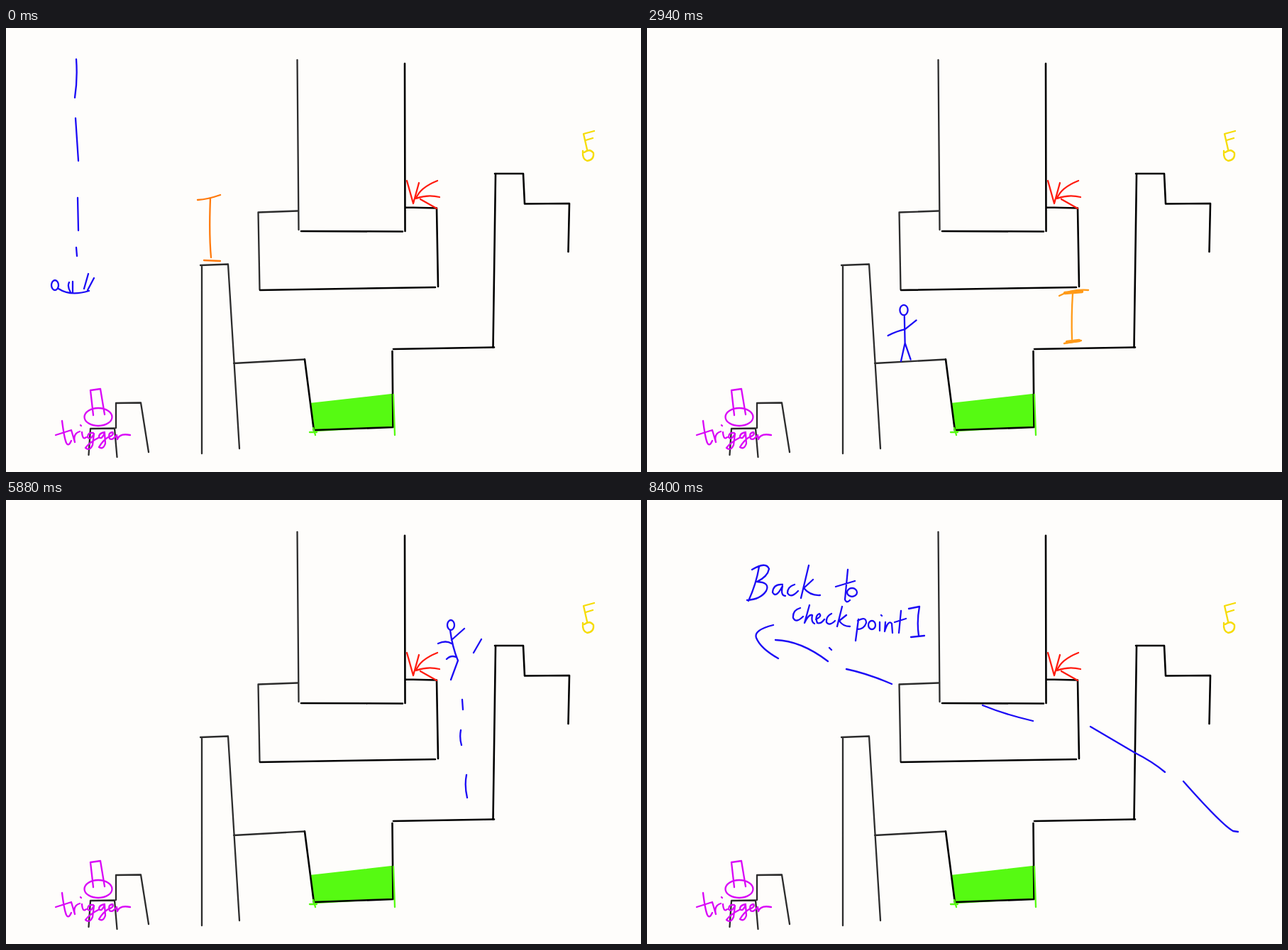
An HTML page for the animation above (8820 ms loop, 895 px wide and 625 px high).

```html
<!DOCTYPE html>
<html lang="en">
<head>
<meta charset="utf-8">
<title>Level sketch</title>
<style>
  html, body { margin: 0; width: 100%; height: 100%; overflow: hidden; background: #fefdfb; }
  svg { display: block; width: 895px; height: 625px; }
  path { fill: none; stroke-width: 2.3; stroke-linecap: round; stroke-linejoin: round; }
  .ink { stroke: #000; stroke-width: 2.6; }
  .soft { stroke: #2c2c2c; }
  .blue { stroke: #1c0cf5; }
  .red { stroke: #ff1c10; }
  .orange { stroke: #ff7a0c; }
  .amber { stroke: #ff9a18; }
  .purple { stroke: #d908f7; }
  .yellow { stroke: #f6dc05; }
  .green { stroke: #56fa12; }
  #liquid { fill: #56fa12; }
  .bold { stroke-width: 4.5; }
</style>
</head>
<body>
<svg viewBox="0 0 895 625">
  <path id="liquid" class="green" stroke-width="1" d="M430 529L545 516L546 561L434 567Z"/>
  <g id="level"></g>
  <g id="scene"></g>
</svg>
<script>
const STEP = 420;
const NS = 'http://www.w3.org/2000/svg';

const stroke = (kind, d, x = 0, y = 0) => {
  const path = document.createElementNS(NS, 'path');
  path.setAttribute('class', kind);
  path.setAttribute('d', d);
  if (x || y) path.setAttribute('transform', `translate(${x} ${y})`);
  return path;
};

const oval = (x, y, rx, ry) => `M${x - rx} ${y}a${rx} ${ry} 0 1 0 ${2 * rx} 0a${rx} ${ry} 0 1 0 ${-2 * rx} 0`;
const blue = d => stroke('blue', d);
const orange = d => stroke('orange', d);

// Upright stick figure: x of the spine, y of the feet, full height.
const man = (x, feet, h) => {
  const at = (dx, up) => `${(x + dx * h).toFixed(1)} ${(feet - up * h).toFixed(1)}`;
  return blue(oval(x, feet - 0.9 * h, 0.07 * h, 0.09 * h) +
    `M${at(0.01, 0.79)}L${at(0.02, 0.32)}L${at(-0.05, 0)}M${at(0.02, 0.32)}L${at(0.12, 0.03)}` +
    `M${at(-0.28, 0.45)}Q${at(-0.12, 0.53)} ${at(0.02, 0.56)}L${at(0.22, 0.72)}`);
};

const melee = (x, y) => stroke('red',
  'M175 260Q182 254 179 271Q180 250 187 251L188 269Q190 248 195 249Q195 262 199 267' +
  'Q211 259 207 252Q201 250 202 263Q207 270 215 258M217 231Q217 253 222 267' +
  'M226 260Q237 257 234 251Q227 249 227 261Q231 269 241 259' +
  'Q251 255 247 250Q240 250 242 261Q248 267 262 257', x, y);
const weapon = (x, y) => stroke('red', 'M249 283L261 282M256 283L241 324M238 325L249 322', x, y);

const barrier = x => [
  stroke('amber', 'M586 377Q604 367 627 369M605 374Q603 405 604 438M593 444L617 440', x),
  stroke('amber bold', 'M594 373L618 371M597 442L614 440', x)
];

const LEVEL = [
  ['soft', 'M276 599L276 334M274 334L313 332.5L329 592M321 472L421 466.5M411 257.5L355.5 259.5L357.5 368'],
  ['soft', 'M410.5 45L412.5 284M155 563L155 528L190 527.5L201 597M116.5 601L119 564L153 563.5L156.5 604'],
  ['ink', 'M562 50L562.5 286M416 286L559 286.5M358 369L605 365M563 252.5L607 253.5L609 364'],
  ['ink', 'M421 466.5L434 567M544.5 455L545.5 562L435 566M546 452L688 449.5M686.5 450L690 206'],
  ['ink', 'M689 205L729 205L731 247.5L794 247L792.5 315'],
  ['green', 'M546 516L548 573M428 569L438 569M433 563L436 573'],
  ['red', 'M565 215L574 247L582 218M608 215Q583 225 578 240Q594 234 611 238M584 241L607 254'],
  ['yellow', 'M829 145L814 149L819 171M817 158L827 155M813 173Q812 185 819 187Q829 186 828 176Q823 169 815 175'],
  ['purple', 'M123 545L119 510L133 508L139 544' + oval(130, 547.5, 19.5, 12.5)],
  ['purple', 'M79 553Q82 577 85 584Q88 590 92 581M70 573L92 566M92 566L97 583Q94 571 104 568' +
    'M107 569Q108 581 113 576M105 559l1 1M123 570Q115 569 115 576Q119 581 124 571L122 587Q118 596 112 591' +
    'Q118 583 130 577M139 569Q131 570 131 576Q135 580 139 570L140 585Q137 594 131 590' +
    'Q137 580 144 576Q153 573 150 569Q143 570 146 578Q150 581 156 573L157 579Q160 570 175 573']
];

const STEPS = [
  [blue('M99 44Q101 72 97 98M98 127L102 187M101 239L102 285M99 309L100 321' + oval(69, 362, 5, 7) +
    'M74 367Q91 378 117 370M91 372Q86 364 89 358M94 372L94 357M110 367L116 346M115 369L124 352'),
   orange('M270 242Q285 241 302 235M288 240Q286 290 289 323M279 327L302 328')],
  [man(157, 525, 85), blue('M136 537L131 554'),
   orange('M273 243Q290 241 307 237M290 242L290 323M281 329L304 328')],
  [man(212, 500, 88), blue('M178 512L188 495'),
   orange('M275 246Q291 238 310 242M293 244L291 323M282 329L307 329')],
  [blue('M256 365L256 378M258 393L259 411' + oval(249, 500, 6, 10.5) +
    'M254 494Q264 484 262 442M251 443L260 462M244 460L256 483M249 460L260 477'),
   orange('M277 249Q285 241 297 241Q308 241 313 246M296 248L292 323M284 330L311 330')],
  [man(190, 450, 88), blue('M133 544L145 520M152 505L162 485'),
   orange('M276 246Q295 238 313 243M293 245L293 324M285 330L309 329')],
  [blue(oval(226.5, 290, 6, 8) + 'M226 300L228 342L222 370M228 342L237 367M201 331Q215 324 228 321L246 307' +
    'M204 353Q208 342 222 336M165 401Q180 382 196 366'),
   orange('M275 244L305 242M290 246Q293 280 294 325M285 329Q295 326 305 327'), melee(), weapon()],
  [man(296, 331, 102), blue('M327 301Q340 307 344 325M350 345L353 368')],
  [man(362, 469, 80), ...barrier(-5)],
  [man(386, 468, 70), ...barrier(-4)],
  [blue(oval(421, 418, 5, 7) + 'M415 421Q406 424 405 446L400 463M405 446L409 463M398 440Q402 429 410 426' +
    'M407 428L414 444M433 431L437 440M448 450L450 454M462 468L467 478'),
   stroke('red', 'M477 520Q467 505 474 492Q482 483 495 488Q500 500 496 517M484 495L493 504' +
    'M493 494L485 506M497 503L497 491L505 493Q502 499 497 500'), ...barrier(0)],
  [man(387, 465, 72), ...barrier(-2)],
  [man(560, 450, 66), blue('M384 465L396 446M411 427Q420 416 433 409M456 399Q472 395 488 399M507 407L522 419'),
   weapon(326, 113), melee(579, 160), ...barrier(-1)],
  [man(620, 448, 66), blue('M419 440Q424 427 434 419M454 407L476 400M502 402L525 410M551 421L573 429')],
  [man(644, 446, 83)],
  [blue(oval(627, 176, 5, 7) + 'M626 183Q629 207 637 226L627 253M609 202Q620 197 628 202M628 197L646 181' +
    'M621 224Q627 218 634 221M670 196L659 215M643 281L644 295M641 324Q639 335 642 345M649 387Q646 402 650 419')],
  [man(625, 176, 84), blue('M661 222L652 200')],
  [man(705, 204, 36), blue('M722 181Q735 187 738 201M741 214L742 226')],
  [man(752, 248, 66)],
  [blue(oval(838.5, 114.5, 6.5, 6) + 'M838 122L819 178M816 147L816 139Q834 137 850 139Q852 132 858 128' +
    'M831 152L845 152L843 166M786 189L779 196M793 181L799 177')],
  [man(845, 456, 85), blue('M868 150Q875 180 872 215M868 250L870 290M862 320L860 350')],
  [blue('M178 176Q150 183 154 194Q160 209 185 223M181 197Q217 198 255 227M257 208L260 211M281 238Q310 244 345 259' +
    'M473 289Q505 302 544 311M625 319L688 356Q712 368 730 383M756 396Q810 457 826 466L833 467'),
   blue('M158 94Q154 118 143 142M148 98Q168 86 172 97Q170 108 155 115Q174 116 168 128Q160 140 141 141' +
    'M191 119Q178 118 177 130Q182 139 191 121Q188 135 195 135M208 119Q198 122 198 131Q203 139 213 128' +
    'M228 92L217 138M234 112L221 124Q230 135 244 134M283 98L279 140Q281 146 286 141M266 122L293 114' + oval(289, 130, 7, 6)),
   blue('M216 152Q205 155 206 166Q210 174 220 164M229 148L222 173Q228 160 233 162Q231 172 236 174' +
    'M238 168Q247 164 243 160Q236 163 240 173Q245 175 250 168M260 160Q252 164 253 172Q257 178 265 170' +
    'M275 150L268 178M281 162L271 170Q276 178 286 178M298 168L294 198M297 170Q309 163 309 173Q306 182 296 182' +
    oval(317, 176, 5, 6) + 'M328 172L328 184M330 162l1 1M336 172L335 185Q340 168 345 174L346 187' +
    'M358 156L355 187M349 172L365 167M369 153L384 150Q380 171 383 191M372 193L391 191')]
];

document.getElementById('level').append(...LEVEL.map(([kind, d]) => stroke(kind, d)));
const scene = document.getElementById('scene');
const start = performance.now();
let shown = -1;

function draw() {
  const elapsed = Math.max(0, performance.now() - start);
  const step = Math.floor(elapsed / STEP) % STEPS.length;
  if (step !== shown) {
    scene.replaceChildren(...STEPS[step]);
    shown = step;
  }
  requestAnimationFrame(draw);
}
draw();
</script>
</body>
</html>
```
